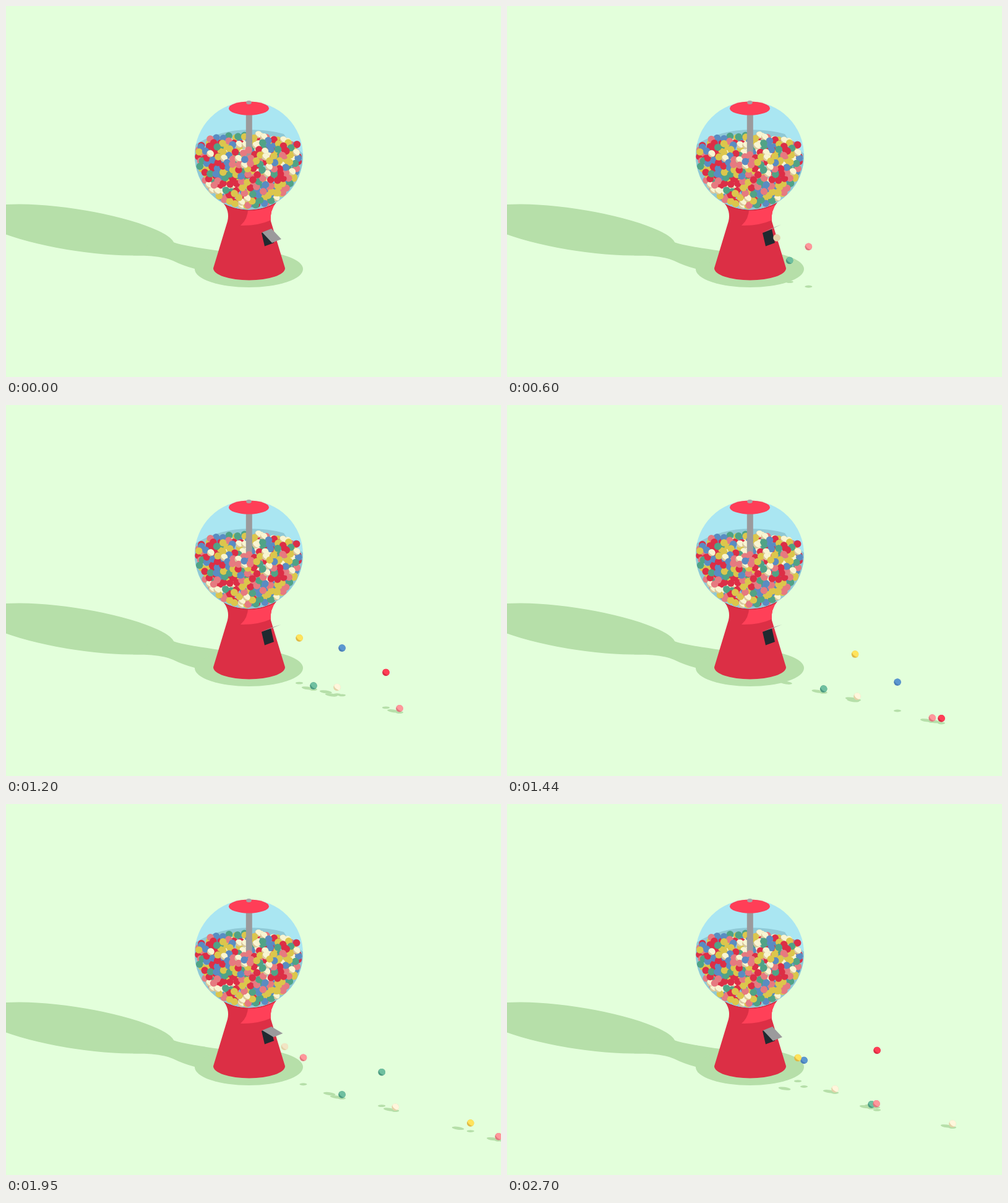
Animation, 800 px wide and 600 px high, one loop 2730 ms. Source, as an HTML page:

```html
<!DOCTYPE html>
<html lang="en">
<head>
<meta charset="utf-8">
<title>Gumball machine</title>
<style>
html, body { margin: 0; width: 100%; height: 100%; overflow: hidden; background: #e3ffdb; }
svg { display: block; width: 800px; height: 600px; }
</style>
</head>
<body>
<svg viewBox="0 0 800 600">
  <defs>
    <clipPath id="glass"><circle cx="392.5" cy="242" r="87.5"/></clipPath>
    <clipPath id="bodyClip"><use href="#body"/></clipPath>
  </defs>
  <rect width="800" height="600" fill="#e3ffdb"/>
  <g fill="#b6dfa9">
    <circle r="1" transform="matrix(160 23.9 0 33.95 112 362)"/>
    <path d="M252 371Q262 375 268 381Q280 387 345 396L345 440L305 425Q286 420 270 412Q250 403 205 403.5Z"/>
    <ellipse cx="392.5" cy="425.5" rx="87.5" ry="29.5"/>
    <g id="shadows"></g>
  </g>
  <path id="body" fill="#dc2f45" d="M350 317Q362 331 358 348L335 424A58 19.5 0 0 0 451 424L428 348Q426 331 437 317Z"/>
  <g clip-path="url(#bodyClip)">
    <path fill="#ff4058" d="M391 322Q393 343 379 355Q406 356 429 346L440 315Z"/>
    <circle cx="392.5" cy="242" r="89" fill="#c9283e"/>
  </g>
  <g clip-path="url(#glass)">
    <rect x="304" y="153" width="178" height="178" fill="#aae6f2"/>
    <path fill="#8fc9d6" d="M304 225Q345 200 393 200Q425 200 449 207L456 218L481 240V331H304Z"/>
    <g id="rear"></g>
    <rect x="387.8" y="165" width="10" height="82" fill="#9b9a9c"/>
    <g id="front"></g>
  </g>
  <ellipse cx="392.5" cy="165.5" rx="32.5" ry="11" fill="#ff3e57"/>
  <ellipse cx="392.5" cy="156" rx="4.3" ry="2.9" fill="#a3a5a8"/>
  <path fill="#1f2a30" d="M413 367L428 361L433 383L418 388.5Z"/>
  <g id="loose"></g>
  <path id="flap" fill="#9b9a9c"/>
</svg>
<script>
const LOOP = 2730, STEP = 30, G = 0.00032, R = 5.8;
const $ = id => document.getElementById(id);

function add(parent, tag, attrs) {
  const el = document.createElementNS('http://www.w3.org/2000/svg', tag);
  for (const k in attrs) el.setAttribute(k, attrs[k]);
  parent.appendChild(el);
  return el;
}

function lerpKeys(keys, t) {
  let i = 0;
  while (i < keys.length - 2 && t > keys[i + 1][0]) i++;
  const [a, b] = [keys[i], keys[i + 1]];
  return a[1] + (b[1] - a[1]) * (t - a[0]) / (b[0] - a[0]);
}

let seed = 77;
function rand() {
  seed = (seed * 1664525 + 1013904223) >>> 0;
  return seed / 4294967296;
}

// Colours: lit, shaded, behind glass
const TONES = {
  r: ['#ff3e55', '#d92b43', '#dc2e46'],
  b: ['#5b97d0', '#4a7fb8', '#5a8cc2'],
  g: ['#6fc0a0', '#4b9a80', '#50a386'],
  y: ['#ffe35c', '#dfb945', '#dcc64c'],
  p: ['#ff979b', '#df777d', '#e67a80'],
  c: ['#fff6dc', '#e3d3a8', '#f8f5d2']
};
const LIT = `M0 ${-R}A${R} ${R} 0 0 1 0 ${R}A2.8 ${R} 0 0 1 0 ${-R}Z`;

// Pile in the globe: a few set balls, the rest scattered
const SET = {
  r: [[433, 216], [325, 246], [333, 260], [376, 265], [402, 240], [442, 263], [399, 281], [395, 294], [351, 287]],
  b: [[340, 213], [452, 261], [380, 275]],
  g: [[360, 210], [375, 211], [414, 265]],
  y: [[350, 222], [456, 221], [312, 236], [343, 244], [390, 285], [382, 294]],
  p: [[330, 215], [392, 233], [366, 256], [391, 272], [428, 291]],
  c: [[408, 208], [469, 237], [330, 239], [385, 257], [425, 260], [422, 271], [341, 299]]
};

function scatter(pile, gap, tries) {
  for (let i = 0; i < tries; i++) {
    const x = 305 + rand() * 175, y = 205 + rand() * 125, u = (x - 393) / 87;
    if (Math.hypot(x - 392.5, y - 242) > 81.5 || y < 209 + 18 * u * u) continue;
    if (pile.some(p => Math.hypot(p.x - x, p.y - y) < gap)) continue;
    pile.push({ x, y, c: 'rbgypc'[Math.floor(rand() * 6)] });
  }
  return pile;
}

const depth = p => Math.min((p.y - 205) * 2,
  Math.sqrt(Math.max(0, 7700 - (p.x - 392.5) ** 2 - (p.y - 242) ** 2)));
const byDepth = (a, b) => depth(a) - depth(b);

function drawPacked(p, parent) {
  p.el = add(parent, 'g', {});
  add(p.el, 'circle', { r: R, fill: p.c === 'c' ? '#dac79c' : TONES[p.c][2] });
  if (p.c === 'c') add(p.el, 'path', { d: LIT, fill: TONES.c[2], transform: 'rotate(-50)' });
}

const top1 = [];
for (const c in SET) for (const [x, y] of SET[c]) top1.push({ x, y, c });
scatter(top1, 8.2, 9000).sort(byDepth);
const under = scatter([], 7, 5000).sort(byDepth);
under.forEach(p => drawPacked(p, $('rear')));
top1.forEach(p => drawPacked(p, p.y < 231 ? $('rear') : $('front')));

function settle(t) {
  const s = 1 - (1 - Math.min(1, t / 1000)) ** 2;
  top1.forEach((p, i) => {
    const dip = 9 * Math.exp(-(((p.x - 393) / 22) ** 2) - ((p.y - 233) / 18) ** 2);
    const fall = p.y < 231 ? 0.8 : dip;
    p.el.setAttribute('transform',
      `translate(${p.x + Math.sin(i * 2.4) * 0.8 * s} ${p.y + fall * s})`);
  });
}
under.forEach(p => p.el.setAttribute('transform', `translate(${p.x} ${p.y})`));

// Loose balls: colour, ground slope, time and height of the first peak, [time, x] keys, bounce
const BALLS = [
  ['g', .345, 330, 52, [[290, 430], [360, 438], [810, 473], [2700, 589]]],
  ['p', .292, 480, 63, [[365, 425], [810, 543], [1200, 636], [1650, 732]]],
  ['c', .297, 620, 58, [[540, 426], [810, 471], [1200, 535], [1650, 593], [2700, 720]]],
  ['r', .285, 950, 71, [[715, 427], [810, 464], [1200, 614], [1650, 779]]],
  ['b', .286, 1125, 72, [[885, 426], [1200, 543], [1650, 708]]],
  ['y', .287, 1315, 71, [[1075, 427], [1200, 474], [1650, 640]]],
  ['g', .289, 1685, 71, [[1445, 426], [1650, 501], [2280, 724]]],
  ['p', .322, 1700, 57, [[1620, 424], [1650, 429], [2280, 537], [2700, 597]]],
  ['c', .3, 1770, 55, [[1740, 427], [2280, 487], [2700, 530]]],
  ['b', .4, 1980, 55, [[1960, 428], [2280, 446], [2700, 480]], .67],
  ['r', .345, 2423, 115, [[1985, 425], [2280, 496], [2700, 598]]],
  ['y', .28, 2430, 55, [[2390, 428], [2700, 470]]]
].map(([c, slope, peak, high, keys, bounce = .1]) => {
  const far = add($('shadows'), 'ellipse', { rx: 10, ry: 2.4 });
  const near = add($('shadows'), 'ellipse', { rx: 6, ry: 1.9 });
  const el = add($('loose'), 'g', {});
  add(el, 'circle', { r: R, fill: TONES[c][1] });
  const lit = add(el, 'path', { d: LIT, fill: TONES[c][0], transform: 'rotate(-48)' });
  return { slope, peak, high, keys, bounce, far, near, el, lit };
});

function height(b, t) {
  let { peak, high } = b, half = Math.sqrt(high / G);
  while (t > peak + half && high > 0.3) {
    const land = peak + half;
    high *= b.bounce;
    half = Math.sqrt(high / G);
    peak = land + half;
  }
  return Math.max(0, high - G * (t - peak) ** 2);
}

function roll(b, t) {
  const shown = t >= b.keys[0][0];
  for (const el of [b.el, b.far, b.near]) el.setAttribute('display', shown ? 'inline' : 'none');
  if (!shown) return;
  const x = lerpKeys(b.keys, t), ground = 431 + b.slope * (x - 430);
  const h = height(b, t), lift = h + 6;
  b.el.setAttribute('transform', `translate(${x} ${ground - h})`);
  b.lit.setAttribute('opacity', Math.max(0, Math.min(1, (x - 443) / 14)));
  b.near.setAttribute('transform', `translate(${x} ${ground + 6})`);
  b.far.setAttribute('transform',
    `translate(${x - 1.55 * lift} ${ground + 6 - .36 * lift}) rotate(8)`);
}

const DOOR = [[0, 45], [300, 114], [810, 115], [1200, 110], [1650, 110], [2280, 17], [2420, 8], [2700, 45], [2730, 45]];

function swing(t) {
  const a = lerpKeys(DOOR, t) * Math.PI / 180;
  const dx = 4.5 * Math.cos(a) + 18.1 * Math.sin(a);
  const dy = 21.5 * Math.cos(a) + 2.5 * Math.sin(a);
  $('flap').setAttribute('d', `M414 366L429 360l${dx} ${dy}l-15 6Z`);
}

function draw(now) {
  const t = Math.floor(now % LOOP / STEP) * STEP;
  settle(t);
  swing(t);
  BALLS.forEach(b => roll(b, t));
}

let start;
function tick(now) {
  start ??= now;
  draw(now - start);
  requestAnimationFrame(tick);
}
draw(0);
requestAnimationFrame(tick);
</script>
</body>
</html>
```
